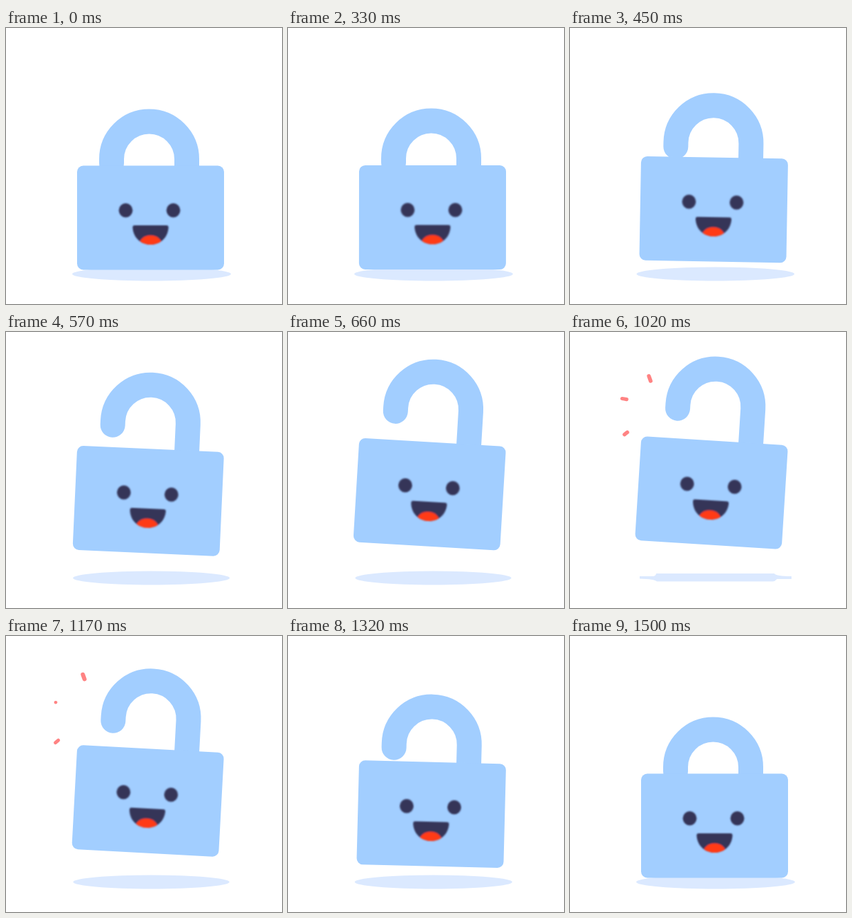
Animation of 400x400 px, one loop 1.8 s. Source, as an HTML page:

```html
<!DOCTYPE html>
<html lang="en">
<head>
<meta charset="utf-8">
<title>Happy padlock</title>
<style>
  html, body { margin: 0; width: 100%; height: 100%; overflow: hidden; background: #fff; }
  svg { display: block; width: 100vw; height: 100vh; }
</style>
</head>
<body>
<svg viewBox="0 0 400 400">
  <defs>
    <filter id="soft" x="-20%" y="-20%" width="140%" height="140%">
      <feGaussianBlur stdDeviation="1"/>
    </filter>
    <clipPath id="lips"><use href="#mouth"/></clipPath>
  </defs>
  <g fill="#dbe9ff">
    <ellipse id="shadow" cy="356.5" ry="10"/>
    <path id="thin" d="M101 354H120Q124 354 125 350H296Q299 354 321 354V358H300Q297 361.500 294 361.500H126Q122 358 101 357.500Z"/>
  </g>
  <!-- the lock is drawn around the centre of its body -->
  <g id="lock">
    <path id="shackle" d="M-56.500 -79V-85A54.500 54.500 0 0 1 52.500 -85V-15" fill="none" stroke="#a2ceff" stroke-width="36" stroke-linecap="round"/>
    <rect x="-106.500" y="-75.500" width="213" height="151" rx="9" fill="#a2ceff"/>
    <g filter="url(#soft)">
      <g id="eyes" fill="#343558">
        <rect width="20" x="-46"/>
        <rect width="20" x="23"/>
      </g>
      <path id="mouth" fill="#343558" d="M-23 11H23Q26 11 26 14C25 30 13 39 0 39S-25 30 -26 14Q-26 11 -23 11Z"/>
      <ellipse cy="38" rx="16" ry="12.500" fill="#ff3a12" clip-path="url(#lips)"/>
    </g>
  </g>
  <g id="sparks" fill="none" stroke="#ff8383" stroke-linecap="round"></g>
</svg>
<script>
const LOOP = 1800, STEP = 30;
const $ = id => document.getElementById(id);
const clamp = x => Math.min(1, Math.max(0, x));
const ramp = (t, a, b) => clamp((t - a) / (b - a));
const mix = (a, b, k) => a + (b - a) * k;
const swing = u => Math.sin(u * Math.PI / 2) ** 2;

// path as start, control, end; trail length early and late; stroke width early and late
const sparks = [
  { pts: [[129, 105], [120, 79.5], [110.7, 54]], len: [.15, .13], w: [5, 6] },
  { pts: [[112, 110], [88, 96], [68, 96]], len: [.36, .01], w: [6, 4.5] },
  { pts: [[108, 129], [93, 136], [69, 157]], len: [.1, .09], w: [6, 5] }
];
for (const s of sparks) {
  s.el = document.createElementNS("http://www.w3.org/2000/svg", "path");
  $("sparks").append(s.el);
}

function along([a, b, c], k) {
  return [0, 1].map(i => mix(mix(a[i], b[i], k), mix(b[i], c[i], k), k).toFixed(2)).join(" ");
}

function lift(t) {
  return t < 900
    ? swing(ramp(t, 300, 720))
    : swing(ramp(t, 1500, 1048) ** .9);
}

function drawSparks(t) {
  const on = t >= 690 && t < 1240;
  $("sparks").style.display = on ? "" : "none";
  if (!on) return;
  const pos = 1 - (1 - ramp(t, 648, 1412)) ** 2;
  const age = ramp(t, 810, 1170);
  const size = Math.min(ramp(t, 660, 780), ramp(t, 1260, 1170));
  for (const s of sparks) {
    const half = mix(...s.len, age) * size / 2;
    const tail = clamp(pos - half), head = clamp(pos + half);
    s.el.setAttribute("d", `M${along(s.pts, tail)}L${along(s.pts, (tail + head) / 2)}L${along(s.pts, head)}`);
    s.el.setAttribute("stroke-width", mix(...s.w, age) * size);
  }
}

function draw(t) {
  const p = lift(t);
  $("lock").setAttribute("transform",
    `translate(${209.5 - 4.5 * p} ${275 - 42 * p}) rotate(${3.6 * p})`);
  $("shackle").setAttribute("transform", `translate(0 ${-40 * p})`);

  const flat = p > .97;
  $("thin").style.display = flat ? "" : "none";
  $("shadow").style.display = flat ? "none" : "";
  $("shadow").setAttribute("cx", 211 - .5 * p);
  $("shadow").setAttribute("rx", 115 - 2 * p);

  const shut = Math.min(ramp(t, 710, 780), ramp(t, 930, 870));
  const h = mix(20.5, 7.5, shut);
  for (const eye of $("eyes").children) {
    eye.setAttribute("y", -10.8 - h / 2);
    eye.setAttribute("height", h);
    eye.setAttribute("rx", mix(10, 3, shut));
    eye.setAttribute("ry", Math.min(h / 2, mix(10.25, 3, shut)));
  }
  drawSparks(t);
}

const begin = performance.now();
function tick() {
  const t = (performance.now() - begin) % LOOP;
  draw(Math.floor(t / STEP) * STEP);
  requestAnimationFrame(tick);
}
tick();
</script>
</body>
</html>
```
